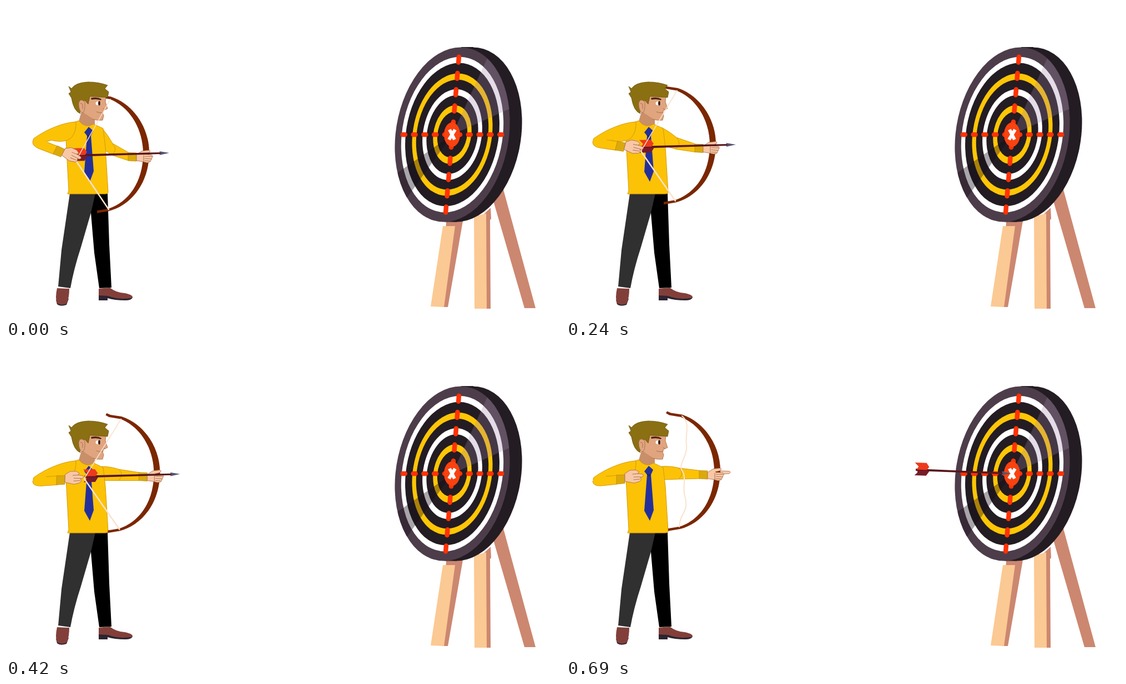
Animation of 998 by 561 pixels, one loop 1200 ms. Source, as an HTML page:

```html
<!DOCTYPE html>
<html lang="en">
<head>
<meta charset="utf-8">
<title>Archer</title>
<style>
html, body { margin: 0; width: 100%; height: 100%; overflow: hidden; background: #fff; }
svg { display: block; width: 100vw; height: 100vh; }
.shirt { fill: #fcc206; stroke: #d39b08; stroke-width: 1; }
.cuff { fill: #dba90b; stroke: #c08f08; stroke-width: .8; }
.hand { fill: #f8c8a6; stroke: #a8694a; stroke-width: .8; stroke-linejoin: round; }
.line { fill: none; stroke: #a8694a; stroke-width: .9; stroke-linecap: round; }
.string { fill: none; stroke: #fae2ce; stroke-linecap: round; stroke-linejoin: round; }
</style>
</head>
<body>
<svg viewBox="0 0 998 561">
  <defs>
    <filter id="smear" filterUnits="userSpaceOnUse" x="0" y="150" width="998" height="160" color-interpolation-filters="sRGB">
      <feGaussianBlur id="blur" stdDeviation="0 0"/>
    </filter>
    <clipPath id="disc"><circle r="1" transform="matrix(102.5 0 -15 157.5 804 232)"/></clipPath>
  </defs>

  <g id="stand">
    <path fill="#cc8770" d="M876 345L896 331L954 545H934ZM793 388H823L796 543H785ZM858 378L873 364L874 384L872 386L873 546H862Z"/>
    <path fill="#fbc993" d="M787 397H809L789 543L765 542ZM843 380L865 374L866 546H844Z"/>
  </g>
  <g id="target">
    <g fill="#231c22">
      <circle r="1" transform="matrix(102.5 0 -15 157.5 826 232)"/>
      <path d="M820 74H842L812 389.500H790Z"/>
    </g>
    <g id="rings" transform="matrix(102.5 0 -15 157.5 804 232)"></g>
    <g clip-path="url(#disc)">
      <path fill="#9a83a5" opacity=".27" d="M804 232L868 92L930 175Z"/>
      <path fill="#120b14" opacity=".36" d="M804 232L698 306L718 352Z"/>
    </g>
    <g id="dashes" stroke="#ff3205" stroke-width="8.500" stroke-linecap="round"></g>
    <ellipse cx="803.500" cy="232" rx="14.500" ry="22" fill="#f9420f"/>
    <path stroke="#fff" stroke-width="6" d="M799 223L808 241M809 223L798 241"/>
  </g>

  <g id="legs">
    <path d="M150 338H183L186 430L190 508L168 509L159 445Z"/>
    <path fill="#303030" d="M115 338H161L153 373L135 435Q122 475 116 509L94 506L100 440Z"/>
    <path fill="#2c2430" d="M167 520H185Q205 529 228 526Q226 531 215 531Q195 531 183 527V531H167ZM90 530L113 528L109 539Q98 543 92 538Z"/>
    <path fill="#823f39" d="M167 510L187 508Q198 517 214 518Q229 521 228 526Q205 531 184 523L167 522ZM92 509L114 510Q114 525 110 536Q101 542 92 536Q88 527 92 509Z"/>
  </g>

  <path id="arm" class="shirt"/>
  <path id="seam" fill="none" stroke="#d39b08" d="M204 222Q214 232 203 242"/>
  <path fill="#c98f69" d="M136 190L160 203V213Q146 224 131 208Z"/>
  <path class="shirt" d="M131 207Q143 222 158 213L175 221L179 255L184 336Q184 339 178 339L111 339L113 333L108 240L119 211Z"/>
  <path fill="#24309a" d="M141 228L149 218L157 225L153 234L158 298L151 317L141 299L146 234Z"/>
  <path fill="#19226f" d="M145 233L153 234L150 237Z"/>
  <path class="shirt" d="M126 209C105 210 75 221 50 239Q46 245 56 250L82 242C96 246 111 245 119 236Q127 225 126 209"/>

  <g class="held">
    <path fill="#7b2700" d="M182 119.500L189 122.500L209 125.500C250 139 278 182 278 226C278 282 245 322 205 332L184 335.500V331L205 327.500C240 316 267 280 267 228C267 186 245 145 207 130L186 126.500L180 123Z"/>
  </g>

  <g id="head">
    <path fill="#e0a57e" stroke="#a5694a" stroke-width=".8" d="M133 168L150 160L180 162L179 173L183 185L176 188L174 193L176 198L174 206Q163 207 156 204L139 193Z"/>
    <path fill="#c98f69" d="M139 192L156 204Q148 207 140 202Z"/>
    <path fill="#8a6f13" stroke="#6c550b" stroke-width=".8" d="M113 145L118 149Q125 138 148 137Q167 137 183 143L178 149L185 155L183 165L151 163L148 177L143 171Q131 168 132 178L134 194Q122 190 118 166L113 158L117 155Z"/>
    <path fill="#e0a57e" stroke="#a5694a" stroke-width=".8" d="M142 173Q133 165 131 176Q131 190 138 193Q143 190 142 173Z"/>
    <path class="line" d="M134 176Q139 173 138 185M163 191Q169 194 175 192M178 187L175 185"/>
    <path fill="#4b2210" d="M153 166Q164 163 172 168L171 170Q163 167 154 169Z"/>
    <ellipse cx="166" cy="175.500" rx="4.500" ry="3.500" fill="#fff"/>
    <ellipse cx="168" cy="175.500" rx="2" ry="4" fill="#3a1710"/>
  </g>

  <g class="held">
    <path class="cuff" d="M240 226.500L255 227V242L240 241Z"/>
    <path id="finger" class="hand" d="M276 227L294 227.500Q298 229.500 294 232L276 233Z"/>
    <path class="hand" d="M255 230L265 223.500L278 222Q282 224 277 227L272 229L283 231Q286 233 283 236L280 243Q275 246 268 243L255 241Z"/>
    <path fill="#7b2700" d="M269 228.500L278 227V230L270 230Z"/>
    <path class="line" d="M270 233L283 233.500M270 237L282 238M270 241L279 241.500M268 231V242"/>
  </g>

  <g id="flight">
    <g id="arrow">
      <path fill="#56161c" d="M-172 -2L-14 -1.500V1.500L-172 2Z"/>
      <path fill="#ee3a1c" d="M-174 -13H-153L-148 -6L-152 -.5H-171L-167 -6Z"/>
      <path fill="#771b2a" d="M-169 1H-147L-153 10H-174L-169 5Z"/>
      <path fill="#585274" d="M-18 -3.500L0 0L-18 3.500L-15 0Z"/>
    </g>
  </g>
  <path id="upper" class="string" stroke-width="1.500"/>
  <path id="lower" class="string" stroke-width="2.500"/>
  <path id="loose" class="string" stroke-width="2" d="M209 128C225 140 214 165 217 180C219 200 204 212 208 225C217 236 211 250 213 268C219 290 216 296 209 308Q205 316 204 328"/>

  <g id="forearm">
    <path class="shirt" d="M72 237L92 235V251L64 254Q48 255 48 245"/>
    <path class="cuff" d="M91 234.500L106 234V249.500L91 251Z"/>
    <path class="hand" d="M106 232L115 226L126 225.500L132 229L129 232L138 233Q141 236 137 238L134 239Q137 243 133 246L123 249L106 246Z"/>
    <path class="line" d="M120 233L130 232M122 238H135M122 243L133 242"/>
  </g>
</svg>
<script>
const $ = id => document.getElementById(id);
const svg = (parent, tag, attrs) => {
  const el = document.createElementNS('http://www.w3.org/2000/svg', tag);
  for (const k in attrs) el.setAttribute(k, attrs[k]);
  parent.append(el);
};

[[1, '#4d3d4a'], [.89, '#fff'], [.82, '#231c22'], [.70, '#fec606'], [.63, '#231c22'],
 [.52, '#fff'], [.45, '#231c22'], [.335, '#fec606'], [.262, '#231c22']]
  .forEach(([r, fill]) => svg($('rings'), 'circle', { r, fill }));

for (const side of [-1, 1]) for (let i = 0; i < 5; i++) {
  const x = 804 + side * (12 + i * 18.8);
  svg($('dashes'), 'line', { x1: x - 2, y1: 232, x2: x + 2, y2: 232 });
  const d = side * (18 + i * 29.3), y = 232 + d;
  svg($('dashes'), 'line', { x1: 804 - d * .085 + .4, y1: y - 5, x2: 804 - d * .085 - .4, y2: y + 5 });
}

// Smooth curve through poses spaced 120 ms apart
function pose(t, p) {
  const s = Math.min(t / 120, 4), i = Math.min(Math.floor(s), 3), u = s - i;
  const a = p[Math.max(i - 1, 0)], b = p[i], c = p[i + 1], d = p[Math.min(i + 2, 4)];
  return b + u / 2 * (c - a + u * (2 * a - 5 * b + 4 * c - d + u * (3 * (b - c) + d - a)));
}

const LAUNCH = 513, FLIGHT = 177;

function draw(t) {
  const dx = pose(t, [-20, -15.5, -8, -2, 0]);
  const dy = pose(t, [38, 33.5, 22.5, 8.7, 0]);
  for (const el of document.querySelectorAll('.held')) el.setAttribute('transform', `translate(${dx} ${dy})`);
  $('arm').setAttribute('d', `M172 219Q${190 + dx * .3} ${218 + dy * .4} ${204 + dx * .6} ${222 + dy * .68}
    L${241 + dx} ${226.5 + dy}V${241 + dy}L${202 + dx * .5} ${242 + dy * .72}L172 ${243 + dy * .35}Z`);
  $('seam').setAttribute('transform', `translate(${dx * .6} ${dy * .7})`);
  $('forearm').setAttribute('transform', `rotate(${pose(t, [27, 23.5, 14.5, 5, 0])} 55 246)`);

  const shot = t > LAUNCH;
  const nock = `${pose(t, [126, 130, 135, 140, 141])} ${pose(t, [279, 275, 262, 246, 238])}`;
  $('upper').setAttribute('d', `M${208 + dx} ${130 + dy}L${nock}`);
  $('lower').setAttribute('d', `M${205 + dx} ${329 + dy}L${nock}`);
  for (const id of ['upper', 'lower']) $(id).style.display = shot ? 'none' : '';
  for (const id of ['loose', 'finger']) $(id).style.display = shot ? '' : 'none';

  const u = Math.min(Math.max((t - LAUNCH) / FLIGHT, 0), 1), e = u * u * (3 - 2 * u);
  const x = pose(t, [294, 299, 306, 312, 314]) + 488 * e;
  const y = pose(t, [265, 261, 250, 238, 229]) + 3 * e;
  $('arrow').setAttribute('transform', `translate(${x} ${y}) rotate(${-1.6 + 3.9 * e})`);
  const blur = 60 * u * (1 - u);
  $('blur').setAttribute('stdDeviation', `${blur} 0`);
  if (blur) $('flight').setAttribute('filter', 'url(#smear)');
  else $('flight').removeAttribute('filter');
}

function tick() {
  draw(Math.floor(performance.now() % 1200 / 30) * 30);
  requestAnimationFrame(tick);
}
tick();
</script>
</body>
</html>
```
